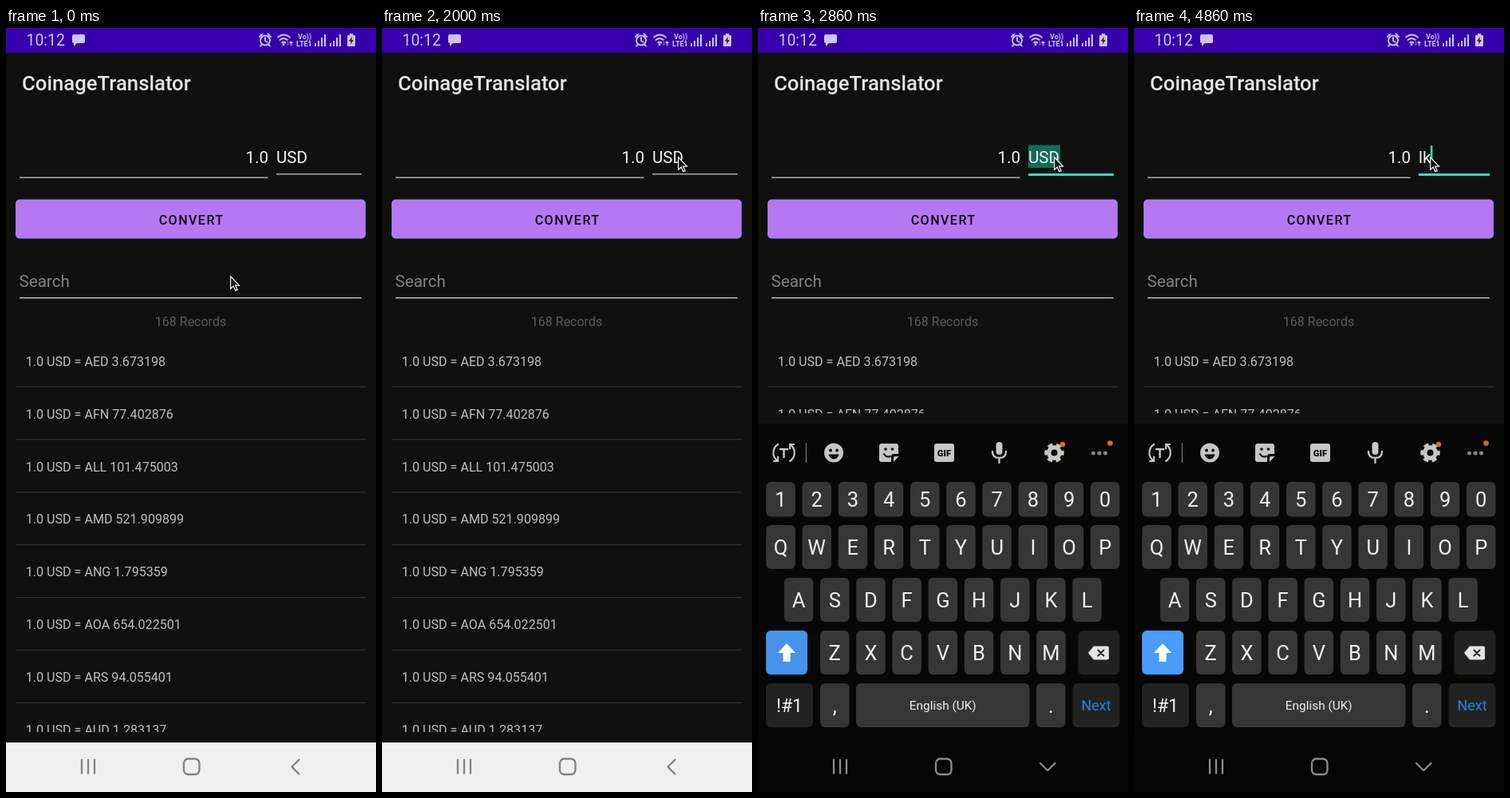
Write an HTML page that moves like this. It is 464x956 px and loops after 5010 ms.

```html
<!DOCTYPE html>
<html lang="en">
<head>
<meta charset="utf-8">
<title>Currency app</title>
<style>
  html, body { margin: 0; width: 100%; height: 100%; overflow: hidden; background: #10110f; }
  svg { display: block; width: 100%; height: 100%; font-family: Roboto, sans-serif; }
  .line { fill: none; stroke-linecap: round; stroke-linejoin: round; }
  .mid { text-anchor: middle; }
  .end { text-anchor: end; }
</style>
</head>
<body>
<svg viewBox="0 0 464 956">
  <defs>
    <clipPath id="listClip"><rect id="listArea" x="0" y="390" width="464" height="491"/></clipPath>
  </defs>
  <rect width="464" height="956" fill="#10110f"/>

  <!-- status bar -->
  <rect width="464" height="31" fill="#3600aa"/>
  <g fill="#cfc4ee">
    <text x="25.5" y="22" font-size="19.4">10:12</text>
    <path d="M85 8h12q2 0 2 2v7q0 2-2 2h-8l-4 4v-4q-2 0-2-2v-7q0-2 2-2z"/>
    <g class="line" stroke="#cfc4ee" stroke-width="1.8">
      <circle cx="325" cy="15.5" r="6"/>
      <path d="M325 12v4l2.5 1.5M318 11l3.5-3.5M332 11l-3.5-3.5M320.500 21l-1.500 1.500M329.500 21l1.500 1.500"/>
      <path d="M341 11.500q7.500-6 15 0M343.500 15q4.500-4 9.500 0M346 18.500q2.500-2 4.500 0" stroke-width="1.7"/>
      <path d="M357.500 22v-5m-1.500 1.500l1.500-1.500 1.500 1.500" stroke-width="1.2"/>
      <path d="M353.500 17.500v4m-1-1l1 1 1-1" stroke-width="1" opacity=".5"/>
    </g>
    <circle cx="348" cy="20.500" r="1.500"/>
    <text x="366" y="14" font-size="9" font-weight="700">Vo))</text>
    <text x="364" y="23" font-size="9" font-weight="700">LTE1</text>
    <path id="signal" d="M387 19h2v4h-2zM391 16h2v7h-2zM395 12h2v11h-2zM399 8h2v15h-2z"/>
    <use href="#signal" x="19"/>
    <path d="M431 7h4v2h2q1 0 1 1v12q0 1-1 1h-8q-1 0-1-1v-12q0-1 1-1h2z"/>
    <path d="M434 11l-4 5.500h2.500l-.5 4 4-5.500h-2.500z" fill="#3600aa"/>
  </g>

  <!-- form -->
  <text x="20" y="77.500" font-size="25.7" font-weight="500" fill="#e6e6e6">CoinageTranslator</text>
  <rect id="highlight" x="339" y="146.500" width="40" height="28.500" fill="#136c59"/>
  <g font-size="20.6" fill="#f4f4f4">
    <text id="amount" class="end" y="168.700">1.0</text>
    <text id="code" y="168.700"></text>
  </g>
  <rect id="amountLine" x="17" y="186.500" height="1.300" fill="#c4c4c4"/>
  <rect id="codeLine"/>
  <rect id="caret" y="147" width="2.600" height="27.500" fill="#2be0bd"/>
  <rect x="12" y="214.500" width="439" height="49" rx="5" fill="#b578f4"/>
  <text class="mid" x="232.700" y="245.600" font-size="16.1" font-weight="500" letter-spacing="1.44" fill="#0d0712">CONVERT</text>
  <text x="16.500" y="324" font-size="20.6" fill="#838383">Search</text>
  <rect x="17" y="337" width="429" height="1.400" fill="#c4c4c4"/>
  <text class="mid" x="231.500" y="373" font-size="16" fill="#5b5b5b">168 Records</text>
  <g id="list" clip-path="url(#listClip)" font-size="16.1" fill="#bebebe"></g>

  <!-- keyboard -->
  <g id="keyboard">
    <rect y="495" width="464" height="461" fill="#070806"/>
    <g fill="#c6c6c4">
      <g class="line" stroke="#c6c6c4" stroke-width="2.200">
        <path d="M25 521a12.500 12.500 0 0 0 0 21M25 536.500v5.500h-5M40 542a12.500 12.500 0 0 0 0-21M40 526.500v-5.500h5"/>
        <path d="M28 527h9M32.500 527v10" stroke-width="2.500"/>
      </g>
      <rect x="59.800" y="519" width="1.200" height="25" fill="#777"/>
      <circle cx="95" cy="531.500" r="12"/>
      <path d="M155 520h18q3 0 3 3v10h-6q-3 0-3 3v7h-12q-3 0-3-3v-17q0-3 3-3zM170 543v-5q0-2 2-2h4.500z"/>
      <rect x="221" y="520" width="25" height="23" rx="3"/>
      <rect x="298.500" y="518" width="8" height="16" rx="4"/>
      <path class="line" d="M294 530q0 8 8.500 8t8.500-8M302.500 538v6" stroke="#c6c6c4" stroke-width="2.300"/>
      <circle cx="371.500" cy="531.500" r="9.500"/>
      <circle cx="371.500" cy="531.500" r="10" fill="none" stroke="#c6c6c4" stroke-width="4.500" stroke-dasharray="6 4.470" stroke-dashoffset="3"/>
    </g>
    <g fill="#070806">
      <circle cx="91" cy="528.500" r="1.900"/><circle cx="99" cy="528.500" r="1.900"/>
      <path d="M88.500 533.500h13q-1.500 6-6.500 6t-6.500-6z"/>
      <circle cx="160" cy="527" r="1.800"/><circle cx="168.500" cy="527" r="1.800"/>
      <path class="line" d="M158 533q3 5 8 3" stroke="#070806" stroke-width="2"/>
      <circle cx="371.500" cy="531.500" r="4"/>
      <text class="mid" x="233.500" y="535.800" font-size="11.5" font-weight="900">GIF</text>
    </g>
    <g fill="#858585">
      <circle cx="420.500" cy="532" r="2.500"/><circle cx="428" cy="532" r="2.500"/><circle cx="435.500" cy="532" r="2.500"/>
    </g>
    <circle cx="382" cy="521" r="3.300" fill="#dd6a20"/>
    <circle cx="441.500" cy="519.500" r="3.300" fill="#dd6a20"/>
    <g id="keys"></g>
    <path d="M36 770l11 12h-6.500v11h-9v-11h-6.500z" fill="#fff"/>
    <path d="M414 782l7-8.500h17q2 0 2 2v13q0 2-2 2h-17z" fill="#e4e4e4"/>
    <path class="line" d="M426.500 778.500l7 7m0-7l-7 7" stroke="#222" stroke-width="2"/>
  </g>

  <!-- navigation bar -->
  <rect id="navBar" y="894" width="464" height="62"/>
  <g id="navIcons" class="line" stroke-width="2.300">
    <path d="M95 915v18.500M103 915v18.500M111 915v18.500" stroke-linecap="butt"/>
    <rect x="223" y="914.500" width="19.500" height="19.500" rx="5.500"/>
    <path id="back"/>
  </g>

  <path id="pointer" d="M.6.800v15.500l3.700-3.300 2.500 5.600 2.400-1-2.500-5.500h4.800z" fill="#16171a" stroke="#f2f2f2" stroke-width="1.200"/>
</svg>
<script>
const LOOP = 5010;
const el = id => document.getElementById(id);
const set = (id, attrs) => {
  for (const name in attrs) el(id).setAttribute(name, attrs[name]);
};
const show = (id, visible) => set(id, { visibility: visible ? "visible" : "hidden" });

// Exchange list
const rates = ["AED 3.673198", "AFN 77.402876", "ALL 101.475003", "AMD 521.909899",
  "ANG 1.795359", "AOA 654.022501", "ARS 94.055401", "AUD 1.283137"];
el("list").innerHTML = rates.map((rate, i) => {
  const y = 65.9 * i;
  return `<text x="24.700" y="${422.7 + y}">1.0 USD = ${rate}</text>
    <rect x="12" y="${448.4 + y}" width="439" height="1.200" fill="#30312f"/>`;
}).join("");

// Keys
function key(x, y, width, height, label = "", { size = 25.5, fill = "#363735", ink = "#f0f0f0", id = "" } = {}) {
  return `<rect ${id && `id="${id}"`} x="${x}" y="${y}" width="${width}" height="${height}" rx="6" fill="${fill}"/>
    <text class="mid" x="${x + width / 2}" y="${y + height / 2 + size * 0.356}" font-size="${size}" fill="${ink}">${label}</text>`;
}
const keyRow = (labels, x, y, height) =>
  [...labels].map((label, i) => key(x + 45.2 * i, y, 36.5, height, label)).join("");
const dark = "#222321";
el("keys").innerHTML =
  keyRow("1234567890", 10.2, 568, 43.5) +
  keyRow("QWERTYUIOP", 10.2, 622, 55) +
  keyRow("ASDFGHJKL", 32.8, 688, 55) +
  keyRow("ZXCVBNM", 78, 754, 55) +
  key(10, 754, 52, 55, "", { id: "shift" }) +
  key(401.5, 754, 52, 55, "", { fill: dark }) +
  key(10, 820, 59, 55, "!#1", { size: 23, fill: dark }) +
  key(78, 820, 36.5, 55, ",") +
  key(123, 820, 217.5, 55, "English (UK)", { size: 15.4 }) +
  key(349, 820, 36.5, 55, ".") +
  key(394.5, 820, 59, 55, "Next", { size: 18, fill: dark, ink: "#2b80e6" });

// Pointer stops: time, x, y
const stops = [
  [0, 281, 310], [140, 287, 291], [290, 289, 284], [430, 290, 276], [570, 295, 269],
  [710, 257, 267], [860, 226, 280], [1000, 204, 287], [1290, 218, 258], [1430, 246, 231],
  [1570, 295, 192], [1710, 304, 177], [1860, 309, 174], [2000, 371, 161]
];

function draw(t) {
  const [, x, y] = stops.findLast(stop => stop[0] <= t);
  set("pointer", { transform: `translate(${x} ${y})` });

  // Currency field
  const focused = t >= 2290;
  const typing = t >= 4430;
  const left = typing ? 357 : 339;
  el("code").textContent = t >= 4860 ? "lk" : typing ? "l" : "USD";
  set("code", { x: left });
  set("amount", { x: left - 10 });
  set("amountLine", { width: left - 27.5 });
  set("codeLine", {
    x: left, width: 446 - left,
    y: focused ? 182 : 182.2, height: focused ? 3 : 1.3,
    fill: focused ? "#2be0bd" : "#c4c4c4"
  });
  show("highlight", focused && !typing);
  set("highlight", { opacity: t < 2430 ? 0.5 : 1 });
  show("caret", typing);
  set("caret", { x: t >= 4860 ? 371.8 : 361.3 });

  // Keyboard and navigation bar
  const open = t >= 2710;
  show("keyboard", open);
  set("keyboard", { transform: `translate(0 ${t < 2860 ? 14 : 0})` });
  set("shift", { fill: t < 3000 ? "#4792ea" : "#4a9bfc" });
  set("listArea", { height: open ? 92 : 491 });
  set("navBar", { fill: open ? "#040504" : "#f0f0ef" });
  set("navIcons", { stroke: open ? "#8b8b8b" : t >= 2570 ? "#dbdbda" : "#828282" });
  set("back", { d: t >= 2570 ? "M354 920l9.300 9 9.300-9" : "M367.500 915.500l-9 9 9 9" });
}

function tick() {
  draw(performance.now() % LOOP);
  requestAnimationFrame(tick);
}
tick();
</script>
</body>
</html>
```
